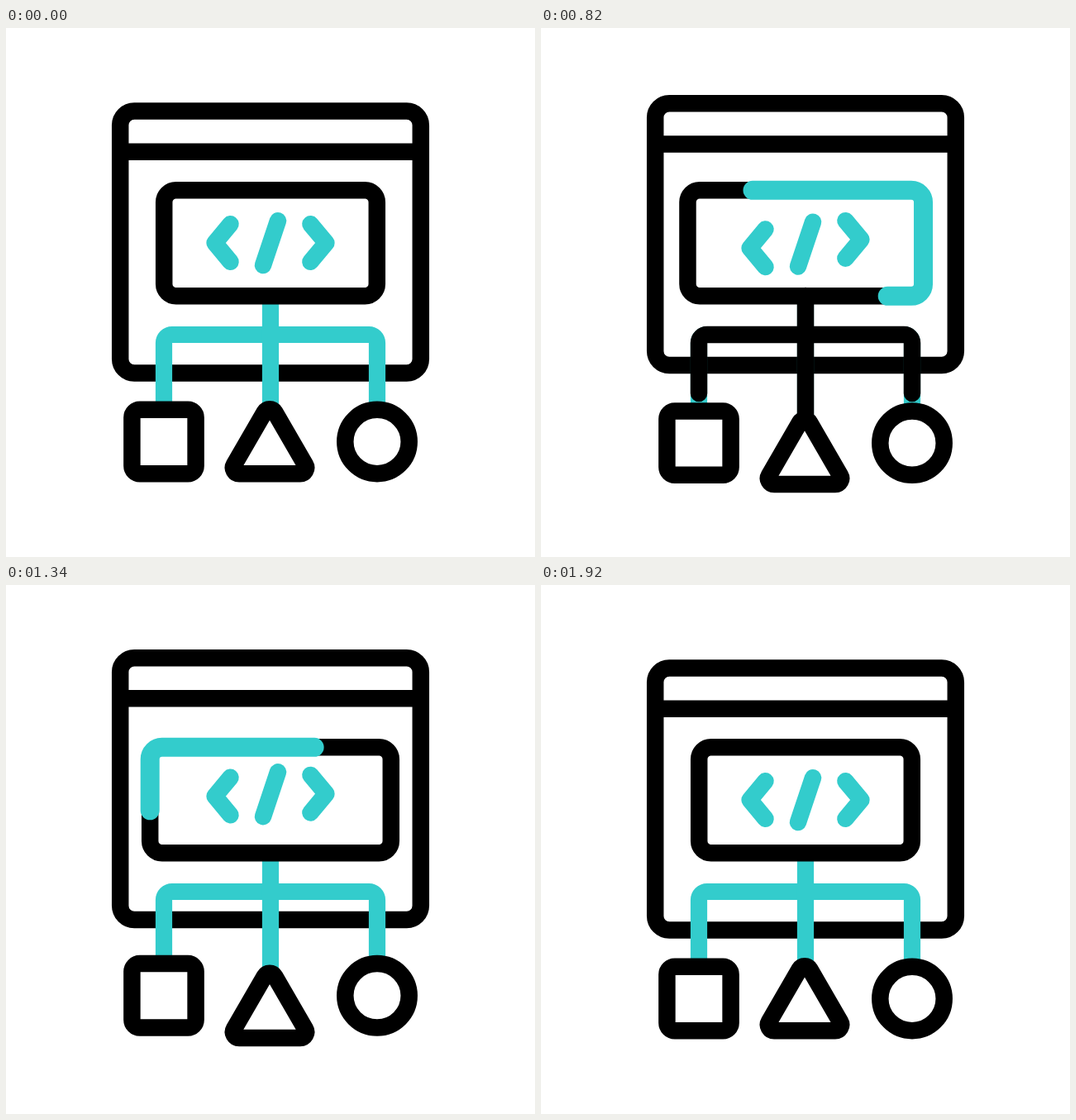
Write an HTML page with a canvas that moves like this. It is 640 px wide and 640 px high and loops after 2.3 s.

```html
<!DOCTYPE html>
<html lang="en">
<head>
<meta charset="utf-8">
<title>Code structure</title>
<style>
  html, body { margin: 0; width: 100%; height: 100%; overflow: hidden; background: #fff; }
  canvas { display: block; width: 100vw; height: 100vh; }
</style>
</head>
<body>
<canvas id="stage" width="640" height="640"></canvas>
<script>
const ctx = document.getElementById("stage").getContext("2d");
const LOOP = 2300, STEP = 20, LINE = 20.5;
const BLACK = "#000", TEAL = "#33cccc", WHITE = "#fff";

// Motion rules, times in ms.
const ramp = (t, start, span) => Math.min(1, Math.max(0, (t - start) / span));
const soft = u => Math.sin(u * Math.PI / 2) ** 2;
const ease = (t, start, span) => soft(ramp(t, start, span));

// Eases from rest through evenly timed peaks.
function swing(t, start, span, peaks) {
  let value = 0, last = 0;
  peaks.forEach((peak, i) => {
    value += (peak - last) * ease(t, start + i * span, span);
    last = peak;
  });
  return value;
}

// The window and panel lean back, stretch, lean back again and settle.
const lean = t => ease(t, 140, 260) - ease(t, 1680, 240);
const stretch = t => 1 - (1 - ramp(t, 400, 860)) ** 2.2 - ease(t, 1260, 420);
const windowShift = t => 7 * lean(t) - 21.3 * stretch(t);
const panelGrow = t => -4 * lean(t) + 23 * stretch(t);

const glyphBob = t => swing(t, 240, 320, [-7.5, 7.5, -7.5, 0]);
const triangleBob = t => swing(t, 700, 227, [23.5, -18.5, 11, 0]);
const sideBob = t => swing(t, 765, 245, [14, -8, 8, 0]);

// Ends of the teal run around the panel, in laps, on a slowly turning start.
const turn = t => 0.00028 * Math.max(0, t - 470);
const runHead = t => turn(t) + soft(ramp(t, 470, 830) ** 0.87);
const runTail = t => turn(t) + ease(t, 908, 708);

function stroke(path, color, width = LINE, cap = "butt") {
  ctx.strokeStyle = color;
  ctx.lineWidth = width;
  ctx.lineCap = cap;
  ctx.lineJoin = "round";
  ctx.stroke(path);
}

function strokePart(path, from, to, color, width) {
  if (to - from < 0.5) return;
  ctx.setLineDash([to - from, 5000]);
  ctx.lineDashOffset = -from;
  stroke(path, color, width, "round");
  ctx.setLineDash([]);
}

function polyline(points) {
  const path = new Path2D();
  points.forEach(([x, y]) => path.lineTo(x, y));
  return path;
}

function box(x0, y0, x1, y1, r) {
  const path = new Path2D();
  path.roundRect(x0, y0, x1 - x0, y1 - y0, r);
  return path;
}

function shifted(dy, draw) {
  ctx.save();
  ctx.translate(0, dy);
  draw();
  ctx.restore();
}

function solid(path) {
  ctx.fillStyle = WHITE;
  ctx.fill(path);
  stroke(path, BLACK);
}

const frame = box(138.2, 100.6, 501.8, 417.4, 17);
const bar = polyline([[138.2, 149.8], [501.8, 149.8]]);

const JOINT = 371;
function branch(x) {
  const path = new Path2D();
  path.moveTo(320, JOINT);
  path.arcTo(x, JOINT, x, 472, 10);
  path.lineTo(x, 472);
  return { path, length: 225, start: 590, back: 1020 };
}
const trunk = { path: polyline([[320, 324], [320, 480]]), length: 156, start: 534, back: 1020 };
const lines = [branch(191), branch(449), trunk];

const chevron = (x, tip) => polyline([[x, 237.3], [tip, 260], [x, 282.8]]);
const glyphs = [
  chevron(271.5, 252.6),
  polyline([[329, 233.2], [311, 287]]),
  chevron(368.4, 387.4)
];

const square = box(152.4, 461.8, 229.6, 539.2, 9.5);
const circle = new Path2D();
circle.arc(449, 500.5, 38.7, 0, Math.PI * 2);
const triangle = new Path2D();
triangle.moveTo(319, 539.3);
triangle.arcTo(269.6, 539.3, 319, 454, 7.2);
triangle.arcTo(319, 454, 368.4, 539.3, 7.2);
triangle.arcTo(368.4, 539.3, 319, 539.3, 7.2);
triangle.closePath();

function drawLines(t) {
  const speed = 0.85;
  lines.forEach(l => stroke(l.path, TEAL, 20.2));
  lines.forEach(l => {
    const head = Math.min(l.length, (t - l.start) * speed);
    const tail = Math.max(0, (t - l.back) * speed);
    strokePart(l.path, tail, head, BLACK, LINE);
  });
}

function drawPanel(t) {
  const grow = panelGrow(t), r = 14.5;
  const x0 = 191.2 - grow, x1 = 448.8 + grow, y0 = 196.3, y1 = 324.3;
  stroke(box(x0, y0, x1, y1, r), BLACK);

  // Two laps, so that the run may cross its starting point.
  const track = new Path2D();
  track.moveTo(x0 + r, y0);
  for (let lap = 0; lap < 2; lap++) {
    track.arcTo(x1, y0, x1, y1, r);
    track.arcTo(x1, y1, x0, y1, r);
    track.arcTo(x0, y1, x0, y0, r);
    track.arcTo(x0, y0, x1, y0, r);
  }
  const around = 2 * (x1 - x0 + y1 - y0) - (8 - 2 * Math.PI) * r;
  const from = Math.max(0, runTail(t) * around - r);
  strokePart(track, from, runHead(t) * around - r, TEAL, 23);
}

function draw(t) {
  ctx.fillStyle = WHITE;
  ctx.fillRect(0, 0, 640, 640);
  shifted(windowShift(t), () => {
    stroke(frame, BLACK);
    stroke(bar, BLACK);
  });
  drawLines(t);
  drawPanel(t);
  glyphs.forEach((g, i) =>
    shifted(glyphBob(t - i * 80), () => stroke(g, TEAL, LINE, "round")));
  shifted(sideBob(t), () => {
    solid(square);
    solid(circle);
  });
  shifted(triangleBob(t), () => solid(triangle));
}

const begin = performance.now();
function tick() {
  const t = (performance.now() - begin) % LOOP;
  draw(Math.floor(t / STEP) * STEP);
  requestAnimationFrame(tick);
}
tick();
</script>
</body>
</html>
```
